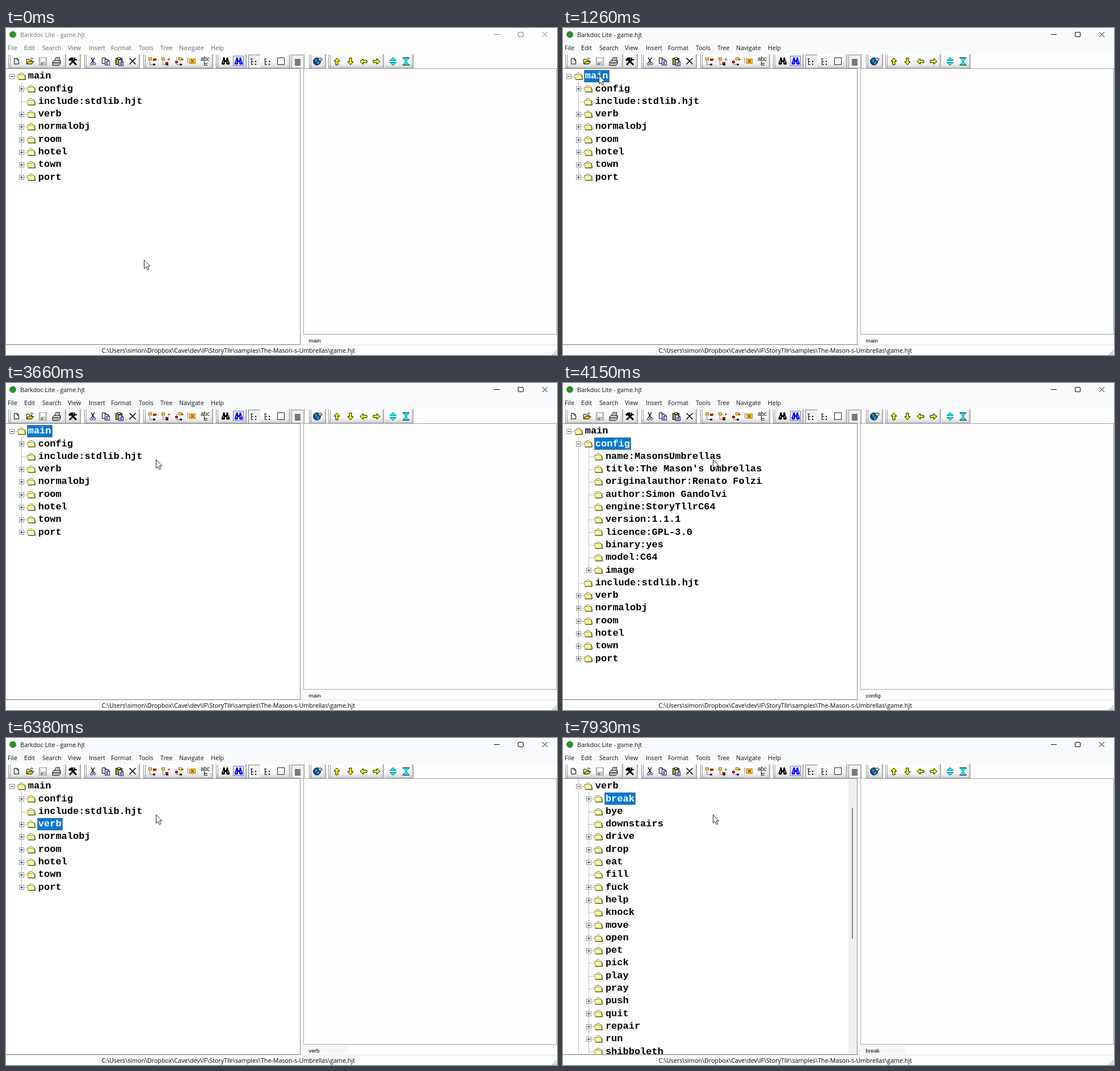
Recreate the animation shown at these times as an HTML page with a canvas. Size 971 by 577 pixels, loop 8 s.

```html
<!DOCTYPE html>
<html lang="en">
<head>
<meta charset="utf-8">
<title>Tree editor</title>
<style>
html, body { margin: 0; width: 100%; height: 100%; overflow: hidden; background: #fff; }
canvas { display: block; }
</style>
</head>
<body>
<canvas id="stage" width="971" height="577"></canvas>
<script>
const ctx = document.getElementById('stage').getContext('2d');
const LOOP = 8000, ROW = 22.3, STEP = 17.8, TEXT_STEP = 18.1;
const UI = '10.7px "Open Sans", "Noto Sans", sans-serif';
const MONO = 'bold 17px "Liberation Mono", monospace';
const SMALL = '9.8px "Liberation Sans", sans-serif';
const EDGE = '#858990';

// Each entry: level, expander sign ("." for none), label
const parse = s => s.split('|').map(e => ({ level: +e[0], sign: e[1], name: e.slice(2) }));
const tail = '1.include:stdlib.hjt|1+verb|1+normalobj|1+room|1+hotel|1+town|1+port';
const closed = parse('0-main|1+config|' + tail);
const configOpen = parse('0-main|1-config|2.name:MasonsUmbrellas|2.title:The Mason\'s Umbrellas|' +
  '2.originalauthor:Renato Folzi|2.author:Simon Gandolvi|2.engine:StoryTllrC64|2.version:1.1.1|' +
  '2.licence:GPL-3.0|2.binary:yes|2.model:C64|2+image|' + tail);
const verbOpen = parse('1-verb|2+break|2.bye|2.downstairs|2+drive|2+drop|2+eat|2.fill|2+fuck|2+help|' +
  '2.knock|2+move|2+open|2+pet|2.pick|2.play|2.pray|2+push|2+quit|2+repair|2+run|2.shibboleth|' +
  '2.sit|1+normalobj');

// Latest entry whose start time has passed
const at = (list, t) => list.filter(e => e[0] <= t).pop()[1];
const trees = [[0, closed], [4150, configOpen], [5390, closed], [6940, verbOpen]];
const picks = [[0, ''], [1260, 'main'], [3910, 'config'], [6140, 'include:stdlib.hjt'], [6380, 'verb'], [7930, 'break']];
// start, end, number of jumps, destination
const moves = [[60, 350, 6, 21, 60], [590, 770, 4, 63, 83], [1430, 1490, 2, 264, 135]];

function pointer(t) {
  let x = 243, y = 409;
  for (const [from, to, n, tx, ty] of moves) {
    if (t < from) break;
    const k = Math.min(1, (Math.floor((t - from) / (to - from) * (n - 1) + 1e-6) + 1) / n);
    const e = k * k * (3 - 2 * k);
    x += (tx - x) * e;
    y += (ty - y) * e;
  }
  return [Math.round(x), Math.round(y)];
}

function rect(c, x, y, w, h) {
  ctx.fillStyle = c;
  ctx.fillRect(x, y, w, h);
}
function box(fill, stroke, x, y, w, h) {
  rect(stroke, x, y, w, h);
  rect(fill, x + 1, y + 1, w - 2, h - 2);
}
function path(pts) {
  ctx.beginPath();
  for (let i = 0; i < pts.length; i += 2) ctx.lineTo(pts[i], pts[i + 1]);
}
function line(c, w, ...pts) {
  path(pts);
  ctx.strokeStyle = c;
  ctx.lineWidth = w;
  ctx.stroke();
}
function poly(fill, stroke, ...pts) {
  path(pts);
  ctx.closePath();
  ctx.fillStyle = fill;
  ctx.fill();
  ctx.strokeStyle = stroke;
  ctx.lineWidth = 1;
  ctx.stroke();
}
function disc(fill, stroke, x, y, r) {
  ctx.beginPath();
  ctx.arc(x, y, r, 0, 7);
  ctx.fillStyle = fill;
  ctx.fill();
  ctx.strokeStyle = stroke;
  ctx.lineWidth = 1;
  ctx.stroke();
}
function text(s, x, y, font, c) {
  ctx.font = font;
  ctx.fillStyle = c;
  ctx.fillText(s, x, y);
}
function dots(c, ...pts) {
  ctx.setLineDash([1, 1]);
  line(c, 1, ...pts);
  ctx.setLineDash([]);
}
function fade(from, mid, to, x0, y0, x1, y1) {
  const g = ctx.createLinearGradient(x0, y0, x1, y1);
  g.addColorStop(0, from);
  g.addColorStop(.6, mid);
  g.addColorStop(1, to);
  return g;
}

function page(x, y, edge) {
  poly('#fff', edge, x, y, x + 5, y, x + 8, y + 3, x + 8, y + 10, x, y + 10);
  line(edge, 1, x + 5, y, x + 5, y + 3, x + 8, y + 3);
}
function binoculars(c) {
  for (const s of [-1, 1]) {
    poly(c, c, s * 1.5, -4, s * 4, -4, s * 6.5, 2, s * 6.5, 5, s * 2, 5, s * 1.5, 0);
    rect(c, s * 3 - 1.5, -7, 3, 3);
    rect('#fff', s * 4 - .5, -1, 1, 4);
  }
  rect(c, -2, -2, 4, 3);
}
function miniTree() {
  rect('#000', -6, -5, 4, 1);
  rect('#000', -5, -5, 1, 11);
  for (const y of [0, 5]) {
    rect('#000', -4, y, 3, 1);
    rect('#000', 2, y - 1, 2, 2);
  }
}
function nodeIcon(x, y, rx, ry) {
  dots('#000', -4.5, -3, -4.5, 5.5, 1, 5.5);
  box('#ffe43b', '#806000', x, y, 6, 5);
  rect('#c00000', rx, ry, 5, 4);
  rect('#000', 1, 4, 4, 3);
  line('#c00000', 1, 4, -3.5, 8, -3.5);
  line('#c00000', 1, 6, -5.5, 6, -1.5);
}
function arrow(angle) {
  ctx.rotate(angle * Math.PI / 2);
  poly('#ffff00', '#000', 0, -6, 5, -.5, 2, -.5, 2, 6, -2, 6, -2, -.5, -5, -.5);
}

const icons = {
  19: () => page(-4.5, -5.5, '#000'),
  42() {
    poly('#ffff80', '#000', -5.5, 4, -5.5, -4, -2, -4, -1, -2.5, 3.5, -2.5, 3.5, 0);
    poly('#e4d020', '#000', -5.5, 4.5, -2.5, 0, 7, 0, 3.5, 4.5);
    line('#000', 1, 1, -5.5, 4, -6, 6, -4);
  },
  65() {
    box('#d4d4d4', '#959595', -7, -7, 14, 14);
    rect('#fff', -4, -6, 8, 6);
    rect('#959595', -4, 2, 8, 5);
    rect('#fff', 1, 3, 2, 3);
  },
  89() {
    poly('#fff', '#000', -3, -1, -1, -7, 6, -7, 4, -1);
    poly('#c8c8c8', '#000', -7, 1, -4, -2, 7, -2, 7, 4, 4, 7, -7, 7);
    line('#000', 1, -7, 2.5, 5, 2.5, 7, 0);
    rect('#d8c800', 0, 4, 3, 1);
    line('#555', 1, 0, -5, 4, -5);
  },
  118() {
    line('#000', 3, -6, 6, 4, -4);
    line('#a09020', 1, -5, 5, 1, -1);
    line('#000', 2, 3, -7, 3, -3, 7, -3);
    line('#000', 3, 6, 6, -3, -3);
    line('#000', 4, -7, -2, -3, -5, 1, -5);
  },
  153() {
    line('#000', 1.5, -3, -7, 2, 2);
    line('#000', 1.5, 3, -7, -2, 2);
    disc('#fff', '#000090', -2.5, 4.5, 2);
    disc('#fff', '#000090', 3, 4, 2);
  },
  176() {
    page(-6.5, -6.5, '#000');
    page(-1.5, -3.5, '#000080');
    for (const y of [0, 2, 4]) rect('#000080', 0, y, 4, 1);
  },
  200() {
    box('#a8a020', '#000', -7, -6, 12, 12);
    box('#ffff60', '#000', -4, -7, 6, 4);
    page(-1.5, -2.5, '#000080');
    for (const y of [1, 3, 5]) rect('#000080', 0, y, 5, 1);
  },
  223() {
    line('#000', 1.6, -5.5, -6, 5.5, 5);
    line('#000', 1.6, 5.5, -6, -5.5, 5);
  },
  258: () => nodeIcon(-7, -7, 1, -5),
  281: () => nodeIcon(-7, -7, 0, 1),
  305: () => nodeIcon(-1, -7, -7, -1),
  327() {
    dots('#000', -6.5, -6, -6.5, 4);
    box('#ffdc30', '#a07000', -4, -5, 11, 9);
    line('#b02000', 1.4, -1, -3, 4, 2);
    line('#b02000', 1.4, 4, -3, -1, 2);
  },
  351() {
    text('abc', -8, -1, '10px "Liberation Sans", sans-serif', '#000');
    line('#000', 1, -1.5, 0, -1.5, 6.5, 4, 6.5);
    line('#000', 1, -1, 3.5, 4, 3.5);
  },
  387: () => binoculars('#000'),
  410() {
    box('#e8ecff', '#6870b8', -10, -10, 19, 18);
    binoculars('#0000f0');
  },
  437: miniTree,
  461: miniTree,
  485: () => box('#fff', '#222', -7, -7, 13, 13),
  514() { for (let y = -4; y < 7; y += 2) rect('#000', -5, y, 10, 1); },
  549() {
    disc('#1038b8', '#183068', -1, 0, 6.5);
    poly('#30a850', '#207040', -5, -3, -1, -5, 0, -1, -3, 2);
    poly('#40c8e8', '#2080a8', 0, 1, 3, 0, 2, 4, -1, 5);
    poly('#c8e8d0', '#204040', 1, -4, 5, -7, 5, -5, 8, -5, 8, -2, 5, -2, 5, 0);
  },
  583: () => arrow(0),
  607: () => arrow(2),
  630: () => arrow(3),
  653: () => arrow(1),
  682() {
    poly('#00f0f0', '#0878a0', 0, -7, 6, -1.5, -6, -1.5);
    poly('#00f0f0', '#0878a0', 0, 7, 6, 1.5, -6, 1.5);
  },
  705() {
    poly('#00f0f0', '#0878a0', -6, -6.5, 6, -6.5, 0, 0);
    poly('#00f0f0', '#0878a0', -6, 6.5, 6, 6.5, 0, 0);
    line('#000', 1, -6, -6.5, 6, -6.5);
    line('#000', 1, -6, 6.5, 6, 6.5);
  }
};

const groups = [[4, 105], [107, 131], [138, 235], [242, 364], [370, 423], [425, 500], [502, 525], [534, 563], [568, 665], [667, 717]];
const gripped = [4, 138, 242, 370, 534, 568];
const menu = { File: 3, Edit: 32, Search: 64, View: 109, Insert: 146, Format: 185, Tools: 234, Tree: 272, Navigate: 305, Help: 361 };

function toolbar() {
  for (const [a, b] of groups) {
    rect(fade('#fff', '#f9f9f9', '#d0d0d0', 0, 46, 0, 71), a, 46, b - a, 25);
    rect(fade('#c4c4c400', '#c4c4c440', '#c4c4c4', b - 6, 0, b, 0), b - 6, 47, 6, 24);
    rect('#a8a8a8', a, 70, b - a, 1);
    rect('#949494', b, 46, 1, 25);
    if (gripped.includes(a)) for (const x of [a, a + 3]) rect('#949494', x, 47, 1, 23);
  }
  for (const [x, w] of [[427, 21], [503, 21]]) {
    rect('#f0f0f0', x, 47, w, 23);
    rect('#848484', x, 47, w, 1);
    rect('#848484', x, 47, 1, 23);
  }
  for (const x in icons) {
    ctx.save();
    ctx.translate(+x, 59);
    icons[x]();
    ctx.restore();
  }
}

function frameUi(active, label) {
  const ink = active ? '#000' : '#777';
  rect('#fdfdfd', 0, 0, 971, 577);
  if (active) rect('#f9fafc', 0, 0, 971, 46);
  disc('#2f8f28', '#2f8f28', 12, 11.5, 5.5);
  text('Barkdoc Lite - game.hjt', 25, 16, UI, active ? '#111' : '#777');
  rect(ink, 860, 11, 10, 1);
  ctx.beginPath();
  ctx.roundRect(902.5, 7.5, 9, 8, 1.5);
  ctx.strokeStyle = ink;
  ctx.lineWidth = 1;
  ctx.stroke();
  line(ink, 1, 945, 7, 954, 16);
  line(ink, 1, 954, 7, 945, 16);
  for (const m in menu) text(m, menu[m], 39, UI, active ? '#111' : '#666');
  toolbar();

  box('#fff', EDGE, -1, 71, 520, 488);
  box('#fefefe', '#a2a5ab', 524, 71, 447, 470);
  if (label === 'verb' || label === 'break') rect('#f6f6f6', 521, 542, 82, 15);
  text(label || 'main', 533.5, 554.5, SMALL, '#000');
  rect('#e2e2e2', 0, 559, 971, 1);
  rect('#dcdcdc', 164, 561, 1, 16);
  text('C:\\Users\\simon\\Dropbox\\Cave\\dev\\IF\\StoryTllr\\samples\\The-Mason-s-Umbrellas\\game.hjt', 168.5, 573, UI, '#000');
  for (let i = 0; i < 3; i++)
    for (let j = 0; j <= i; j++) rect('#b0b0b0', 968 - 3 * j, 569 + 3 * i, 2, 2);
}

function folder(x, y) {
  poly('#ffffd8', '#78784c', x + 3, y - 2.5, x + 5, y - 5.5, x + 9, y - 5.5, x + 12, y - 2.5);
  poly('#ffff99', '#8c8638', x + .5, y - 2.5, x + 12.5, y - 2.5, x + 14, y + 5.5, x + 2, y + 5.5);
  line('#fffff0', 1, x + 2, y - 1.5, x + 11, y - 1.5);
  line('#333318', 1, x + 2, y + 6, x + 14.5, y + 6, x + 13.5, y - 2);
}
function expander(x, y, sign) {
  box('#fff', '#929292', x - 4, y - 4, 9, 9);
  rect('#222a50', x - 2, y, 5, 1);
  if (sign === '+') rect('#222a50', x, y - 2, 1, 5);
}

function tree(rows, picked) {
  const mid = i => Math.round(85 + i * ROW);
  ctx.save();
  ctx.beginPath();
  ctx.rect(0, 72, 518, 486);
  ctx.clip();
  for (const lv of [1, 2]) {
    const ids = rows.map((r, i) => r.level === lv ? i : -1).filter(i => i >= 0);
    if (!ids.length) continue;
    const x = Math.round(9.5 + lv * STEP) + .5;
    dots('#858585', x, mid(ids[0]) - 12, x, mid(ids[ids.length - 1]));
  }
  rows.forEach((r, i) => {
    const y = mid(i), dx = r.level * STEP, ex = Math.round(9.5 + dx);
    const on = r.name === picked;
    dots('#858585', ex + .5, y + .5, ex + 10.5, y + .5);
    if (r.sign !== '.') expander(ex, y, r.sign);
    folder(Math.round(19.5 + dx), y);
    if (on) box('#0078d7', '#6f8088', Math.round(37 + dx), y - 11, Math.round(r.name.length * 10.2 + 4), 22);
    text(r.name, 38.7 + r.level * TEXT_STEP, 89.2 + i * ROW, MONO, on ? '#fff' : '#000');
  });
  if (rows === verbOpen) {
    rect('#f0f0f0', 503, 72, 15, 486);
    rect('#858585', 509, 123, 2, 231);
  }
  ctx.restore();
}

function draw() {
  const t = performance.now() % LOOP;
  const picked = at(picks, t);
  frameUi(t >= 1260, picked);
  tree(at(trees, t), picked);
  const [x, y] = pointer(t);
  ctx.save();
  ctx.translate(x + .5, y + .5);
  poly('#fff', '#1c1c30', 0, 0, 0, 15, 3.4, 12, 5.8, 17.2, 8.2, 16.2, 5.9, 11, 10.3, 10.6);
  ctx.restore();
  requestAnimationFrame(draw);
}
draw();
</script>
</body>
</html>
```
